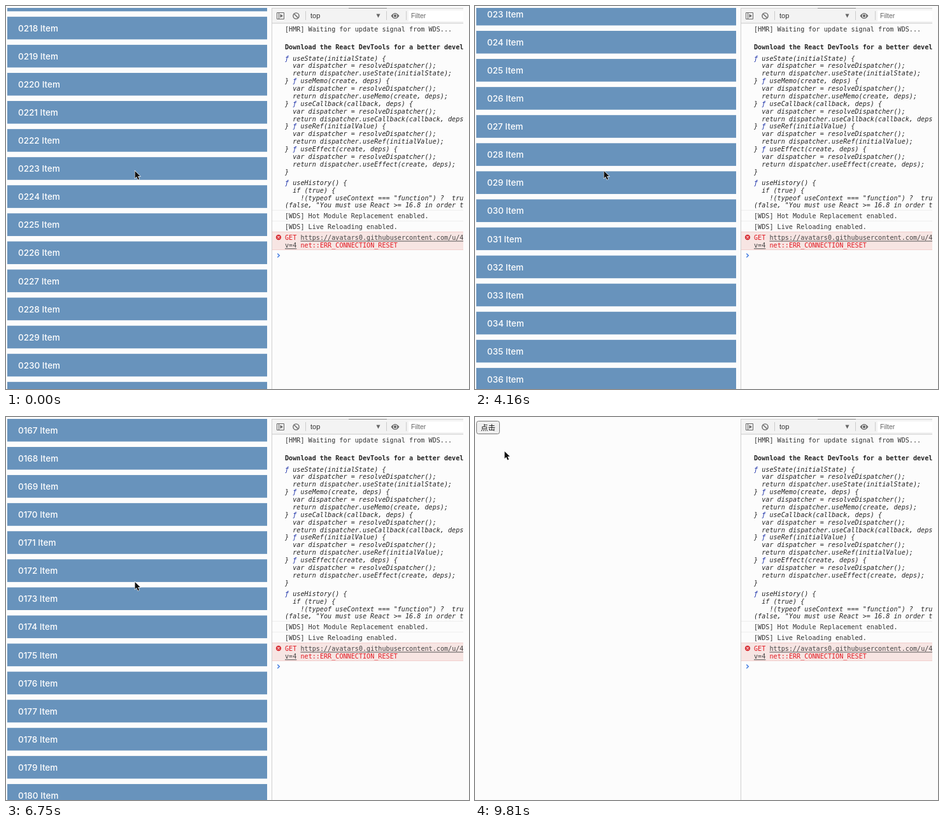
Write an HTML page with a canvas that moves like this. It is 727 px wide and 601 px high and loops after 9910 ms.

```html
<!DOCTYPE html>
<html lang="en">
<head>
<meta charset="utf-8">
<title>Long list</title>
<style>
html, body { margin: 0; height: 100%; overflow: hidden; background: #fcfcfc; }
canvas { display: block; }
</style>
</head>
<body>
<canvas id="stage" width="727" height="601"></canvas>
<script>
const ctx = document.getElementById('stage').getContext('2d');
const LOOP = 9910, PITCH = 44.08, TOP = -0.43, CHAR = 6.11;
const MONO = '10.15px "DejaVu Sans Mono", monospace';
const SANS = '"Liberation Sans", sans-serif';

const SPANS = [0, 150, 1180, 1300, 2320, 2440, 3380, 3500, 4400, 4550, 5000, 5120, 5510, 5660,
  6060, 6210, 6600, 6750, 7440, 7560, 7680, 7800, 7950, 8760, 9690, 9810, LOOP];

// [time, row index at the first text line]
const SCROLL = [[0, 218], [297, 234.91], [2199, 234.91], [2200, TOP], [3250, TOP], [3380, 0.637],
  [3600, 4.1], [3820, 10], [4040, 18.4], [4265, 29.55], [5000, 70.27], [6060, 129.02],
  [7440, 205.61], [7950, 234.91]];

// [time, x, y]
const POINTER = [[0, 202, 259], [450, 202, 259], [1030, 18, -18], [1450, 18, -18], [1600, 46, 54],
  [1850, 22, 18], [2200, 22, 18], [2800, 202, 259], [8640, 202, 259], [9250, 18, -18],
  [9560, 18, -18], [9810, 46, 54]];

function stepTime(t) {
  const i = SPANS.findIndex((s, k) => t >= s && t < SPANS[k + 1]);
  const from = SPANS[i], span = SPANS[i + 1] - from;
  const step = span / Math.max(1, Math.round(span / 138));
  return from + Math.floor((t - from) / step + 1e-6) * step;
}

function at(keys, t, col = 1) {
  const i = keys.findIndex(k => k[0] > t);
  if (i < 0) return keys[keys.length - 1][col];
  const a = keys[i - 1], b = keys[i];
  return a[col] + (b[col] - a[col]) * (t - a[0]) / (b[0] - a[0]);
}

function rect(x, y, w, h, color) {
  ctx.fillStyle = color;
  ctx.fillRect(x, y, w, h);
}

function text(str, x, y, font, color) {
  ctx.font = font;
  ctx.fillStyle = color;
  ctx.fillText(str, x, y);
}

function shape(d, fill, stroke, width = 1) {
  const path = new Path2D(d);
  if (fill) { ctx.fillStyle = fill; ctx.fill(path); }
  if (stroke) { ctx.strokeStyle = stroke; ctx.lineWidth = width; ctx.stroke(path); }
}

function circle(x, y, r, fill, stroke, width) {
  shape(`M${x - r} ${y}a${r} ${r} 0 1 0 ${2 * r} 0a${r} ${r} 0 1 0 ${-2 * r} 0`, fill, stroke, width);
}

function drawButton(y) {
  ctx.beginPath();
  ctx.roundRect(2.5, y + 0.5, 36, 20, 3);
  ctx.fillStyle = '#efefef';
  ctx.fill();
  ctx.strokeStyle = '#777';
  ctx.lineWidth = 1;
  ctx.stroke();
  text('点击', 9, y + 15, '11.5px "Noto Sans CJK SC", "Noto Sans CJK", sans-serif', '#111');
}

function drawList(pos, open) {
  ctx.save();
  ctx.beginPath();
  ctx.rect(0, 3, 416, 598);
  ctx.clip();
  if (!open) drawButton(6);
  else {
    drawButton(6 - (pos - TOP) * PITCH);
    const first = Math.max(0, Math.floor(pos) - 1);
    for (let i = first; i < Math.min(250, first + 17); i++) {
      const y = 35 + (i - pos) * PITCH;
      rect(2, y - 18.2, 408, 35.6, '#6893bc');
      text(`0${i} Item`, 19, y + 4.8, '500 13.5px Inter, sans-serif', '#fff');
    }
  }
  ctx.restore();
}

function drawToolbar() {
  rect(418, 3, 300, 24, '#f3f3f3');
  rect(418, 3, 300, 1, '#d0d0d0');
  rect(538, 3, 60, 1, '#888');
  rect(418, 26.5, 300, 1, '#ccc');
  for (const x of [470, 597, 628]) rect(x, 8, 1, 14, '#ccc');
  shape('M425.5 10.5h11v10h-11zM428.5 10.5v10', null, '#666');
  shape('M430.5 12.5l4.5 3l-4.5 3z', '#666');
  circle(455.5, 15.5, 4.6, null, '#666', 1.4);
  shape('M452.2 12.2l6.6 6.6', null, '#666', 1.4);
  text('top', 478, 19, '11px ' + SANS, '#333');
  shape('M581.5 12.5h6l-3 6z', '#666');
  shape('M604.5 15.5q6.5 -9 13 0q-6.5 9 -13 0z', '#666');
  circle(611, 15.5, 2.7, '#666', '#f3f3f3', 1.1);
  rect(632, 7, 86, 17, '#fff');
  text('Filter', 636, 19, '10.5px ' + SANS, '#666');
}

function hook(name, args, i) {
  const call = `${name}(${args})`;
  return [`${i ? '} ' : ''}ƒ ${call} {`, '  var dispatcher = resolveDispatcher();',
    `  return dispatcher.${call};`];
}

const CODE = [['useState', 'initialState'], ['useMemo', 'create, deps'],
  ['useCallback', 'callback, deps'], ['useRef', 'initialValue'], ['useEffect', 'create, deps']]
  .flatMap(([name, args], i) => hook(name, args, i)).concat('}');
const HISTORY = ['ƒ useHistory() {', '  if (true) {',
  '    !(typeof useContext === "function") ?  true',
  '(false, "You must use React >= 16.8 in order to'];

function drawCode(lines, y) {
  lines.forEach((line, i) => {
    const base = y + i * 11.87, f = line.indexOf('ƒ');
    text(line.replace('ƒ', ' '), 438, base, 'italic ' + MONO, '#222');
    if (f >= 0) text('ƒ', 438 + f * CHAR, base, 'italic ' + MONO, '#1a2fa8');
  });
}

function drawConsole() {
  ctx.save();
  ctx.beginPath();
  ctx.rect(417, 3, 301, 598);
  ctx.clip();
  rect(417, 3, 1, 598, '#cfcfcf');
  drawToolbar();
  text('[HMR] Waiting for update signal from WDS...', 438, 39.6, MONO, '#333');
  text('Download the React DevTools for a better development', 438, 68.4, 'bold ' + MONO, '#222');
  drawCode(CODE, 85.6);
  drawCode(HISTORY, 280.8);
  text('[WDS] Hot Module Replacement enabled.', 438, 333.2, MONO, '#333');
  text('[WDS] Live Reloading enabled.', 438, 350.2, MONO, '#333');
  for (const y of [320, 337]) rect(418, y, 300, 1, '#eee');
  rect(418, 354, 300, 29, '#f7e5e3');
  rect(418, 354, 300, 1, '#f1cfcd');
  rect(418, 382, 300, 1, '#f1cfcd');
  circle(428, 363, 4.2, '#d9343a');
  shape('M426.4 361.4l3.2 3.2m0 -3.2l-3.2 3.2', null, '#fff', 1.1);
  const url = 438 + 4 * CHAR;
  text('GET', 438, 367.2, MONO, '#e01a22');
  text('https://avatars0.githubusercontent.com/u/4', url, 367.2, MONO, '#444');
  text('v=4', 438, 379, MONO, '#444');
  text('net::ERR_CONNECTION_RESET', url, 379, MONO, '#e01a22');
  rect(url, 368.5, 256, 1, '#555');
  rect(438, 380.3, 3 * CHAR, 1, '#555');
  shape('M426.3 388.6l3 2.9l-3 2.9', null, '#3b78e0', 1.4);
  ctx.restore();
}

function drawPointer(x, y) {
  if (y < -16) return;
  ctx.save();
  ctx.beginPath();
  ctx.rect(0, 3, 727, 598);
  ctx.clip();
  ctx.translate(x, y);
  shape('M0.5 0v11.2l2.6-2.4l2 4.6l2-.9l-2-4.4h3.6z', '#111', '#fff', 1.2);
  shape('M0.5 0v11.2l2.6-2.4l2 4.6l2-.9l-2-4.4h3.6z', '#111');
  ctx.restore();
}

function frame() {
  const t = stepTime(performance.now() % LOOP);
  const open = t < 1300 || (t >= 2200 && t < 9400);
  rect(0, 0, 727, 601, '#fcfcfc');
  drawList(at(SCROLL, t), open);
  drawConsole();
  drawPointer(at(POINTER, t), at(POINTER, t, 2));
  requestAnimationFrame(frame);
}
frame();
</script>
</body>
</html>
```
